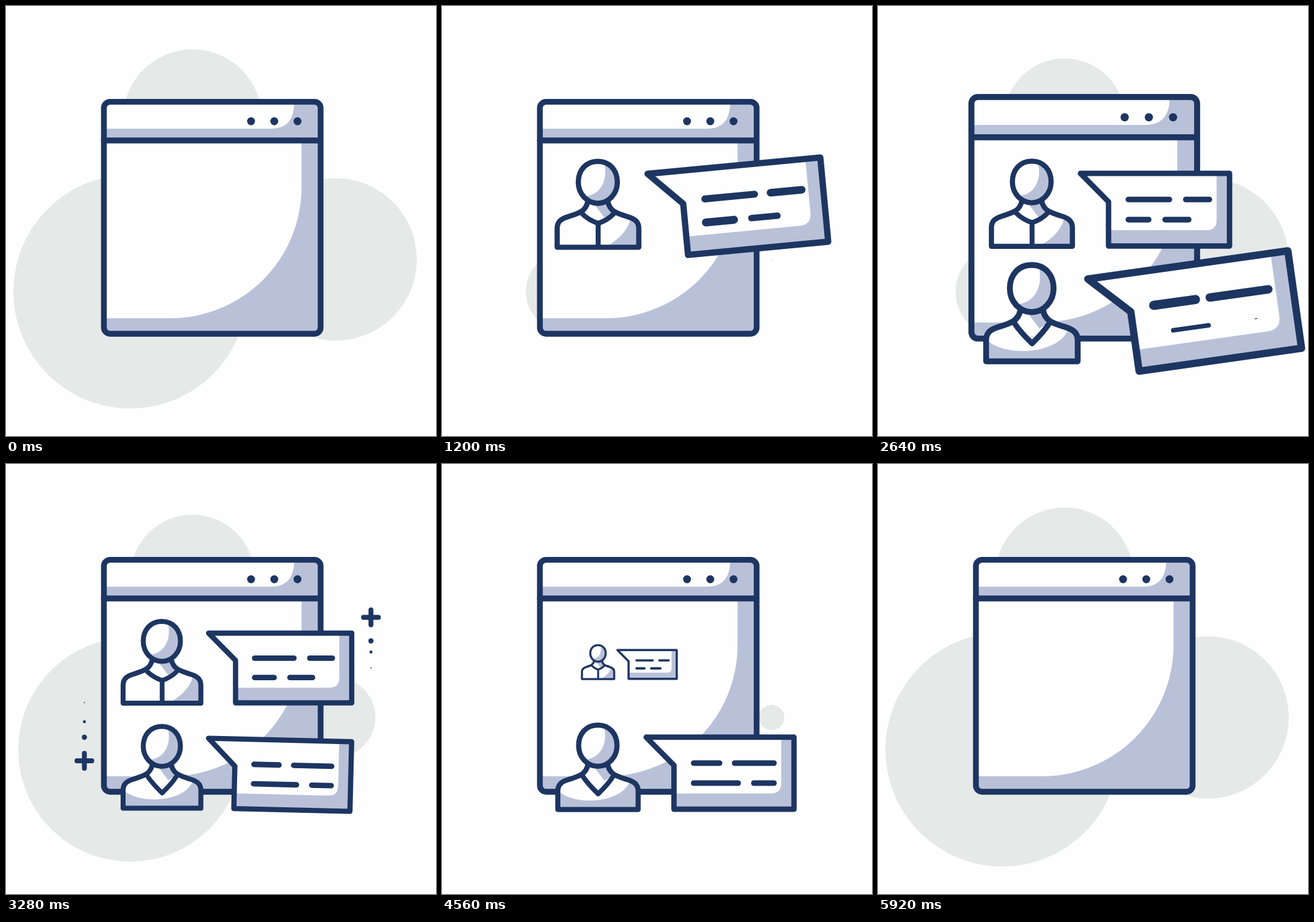
An HTML page with a canvas for the animation above (6 s loop, 694 px wide and 694 px high).

```html
<!DOCTYPE html>
<html lang="en">
<head>
<meta charset="utf-8">
<title>Chat window</title>
<style>
  html, body { margin: 0; width: 100%; height: 100%; overflow: hidden; background: #fefefe; }
  canvas { display: block; width: 694px; height: 694px; }
</style>
</head>
<body>
<canvas id="stage" width="694" height="694"></canvas>
<script>
const ctx = document.getElementById('stage').getContext('2d');
const NAVY = '#1d3561', SHADE = '#b9c1d9', PALE = '#e5e9e8', WHITE = '#fefefe';
const LOOP = 6000, STEP = 80;
const ROW = 169.5; // distance between the two chat rows

// Eased track through time/value pairs; holds its ends.
function track(t, ...keys) {
  if (t <= keys[0]) return keys[1];
  for (let i = 2; i < keys.length; i += 2) {
    if (t < keys[i]) {
      const x = (t - keys[i - 2]) / (keys[i] - keys[i - 2]);
      return keys[i - 1] + (keys[i + 1] - keys[i - 1]) * (1 - Math.cos(Math.PI * x)) / 2;
    }
  }
  return keys[keys.length - 1];
}

const popIn = (t, start, rise, fall) =>
  track(t, start, 0, start + rise, 1.2, start + rise + fall, 1);

// Draws around a pivot, scaled and turned.
function around(x, y, scale, degrees, draw) {
  if (scale < 0.004) return;
  ctx.save();
  ctx.translate(x, y);
  ctx.rotate(degrees * Math.PI / 180);
  ctx.scale(scale, scale);
  ctx.translate(-x, -y);
  draw();
  ctx.restore();
}

function fill(d, color) {
  ctx.fillStyle = color;
  ctx.fill(new Path2D(d));
}

function stroke(d, width) {
  ctx.strokeStyle = NAVY;
  ctx.lineWidth = width;
  ctx.lineJoin = ctx.lineCap = 'round';
  ctx.stroke(new Path2D(d));
}

function disc(x, y, r, color) {
  ctx.fillStyle = color;
  ctx.beginPath();
  ctx.arc(x, y, Math.max(r, 0), 0, 7);
  ctx.fill();
}

function clipped(d, draw) {
  ctx.save();
  ctx.clip(new Path2D(d));
  draw();
  ctx.restore();
}

function backdrop(t) {
  disc(200.5, 461, 188.5 * track(t, 0, 1, 2000, 0, 3472, 1, 4900, 0, 5920, 1), PALE);
  disc(301, 182, 112 * track(t, 0, 1, 1600, 0, 2960, 1, 4480, 0, 5960, 1), PALE);
  disc(532, 409, 131 * track(t, 0, 1, 1100, 0, 2590, 1, 3954, 0, 4100, 0, 5880, 1), PALE);
}

function browser(t) {
  const frame = new Path2D();
  frame.roundRect(158, 154.6, 349.8, 374.4, 10);
  ctx.fillStyle = SHADE;
  ctx.fill(frame);
  fill('M160 157H465C465 184 452 198 428 198H160Z', WHITE);
  fill('M160 217H477V292A212 212 0 0 1 265 504H160Z', WHITE);
  ctx.strokeStyle = NAVY;
  ctx.lineWidth = 9.3;
  ctx.stroke(frame);
  stroke('M158 217H507', 9.3);
  for (let i = 0; i < 3; i++) {
    const dip = 1600 + 160 * i;
    disc(395.5 + 37.5 * i, 186, 6.4 * track(t, dip - 160, 1, dip, 0.78, dip + 160, 1), NAVY);
  }
}

const HEAD = 'M251.5 254C270 254 281.5 268 281.5 286C281.5 304 268 318.5 251.5 318.5' +
  'C235 318.5 221.5 304 221.5 286C221.5 268 233 254 251.5 254Z';
const BODY = 'M189 386V357C189 346 196 342 206 339C222 334 233 331 236 316' +
  'H267C270 331 281 334 297 339C307 342 314.5 346 314.5 357V386Z';

function person(vNeck) {
  fill(BODY, WHITE);
  clipped(BODY, () => {
    fill(vNeck
      ? 'M185 350C200 381 292 381 303 338H325V392H185Z'
      : 'M302 335C303 354 286 374 262 386H325V335Z', SHADE);
    if (vNeck) fill('M228 316H275V334L252 361L228 334Z', WHITE);
    fill('M243 316H272L275 333L262 341Z', SHADE);
  });
  stroke(BODY, 8);
  stroke(vNeck ? 'M228 334Q236 346 252 361.5Q268 346 275.5 334'
               : 'M228 335Q237 344 252 349.5Q267 344 275.5 335M252 349V385', 7.6);
  fill(HEAD, WHITE);
  clipped(HEAD, () =>
    fill('M259 250C269 276 260 307 229 308L240 325H290V250Z', SHADE));
  stroke(HEAD, 8);
}

function bubble(t, start, dashes) {
  const outline = 'M327 273H558V385.5H370.5V317Z';
  fill(outline, SHADE);
  fill('M327 273H538V345Q538 361 522 361H370.5V317Z', WHITE);
  stroke(outline, 8.4);
  dashes.forEach(([left, right], i) => {
    const y = i < 2 ? 313.4 : 344.7;
    const size = popIn(t, start + 700 + 96 * i, 300, 300);
    around((left + right) / 2, y, size, 0, () =>
      stroke(`M${left + 4.3} ${y}H${right - 4.3}`, 8.8));
  });
}

function chatRow(t, start, exit, vNeck, dashes) {
  const size = t < exit
    ? popIn(t, start + 200, 600, 600)
    : track(t, exit, 1, exit + 600, 1.2, exit + 1200, 0);
  const local = t - start;
  const tilt = track(local, 640, 0, 1050, -8, 1500, 2.4, 1900, 0);
  around(252, 319.5, size, 0, () => {
    person(vNeck);
    around(323.5, 269, popIn(local, 410, 600, 600), tilt, () => bubble(t, start, dashes));
  });
}

function sparkle(t, x, y, gaps) {
  const out = track(t, 3900, 1, 4400, 0);
  const size = i => popIn(t, 2840 + 100 * i, 600, 400) * out;
  around(x, y, size(0), 0, () => stroke(`M${x - 12} ${y}H${x + 12}M${x} ${y - 12}V${y + 12}`, 7.8));
  gaps.forEach((gap, i) => disc(x, y + gap, 5.8 * size(i + 1), NAVY));
}

function render(t) {
  ctx.fillStyle = WHITE;
  ctx.fillRect(0, 0, 694, 694);
  backdrop(t);
  const zoom = track(t, 0, 1, 600, 1.25, 1200, 1, 1600, 1, 2200, 1.25, 2800, 1);
  around(332.5, 341.5, zoom, 0, () => {
    browser(t);
    chatRow(t, 0, 3600, false, [[397, 469], [486, 531], [397, 437], [454, 499]]);
    ctx.translate(0, ROW);
    chatRow(t, 1600, 4400, true, [[397, 446], [461, 531], [397, 475], [491, 531]]);
  });
  sparkle(t, 589, 247.5, [38, 56, 81.5]);
  sparkle(t, 126.5, 479, [-38, -63, -94]);
}

const begin = performance.now();
function tick() {
  const t = (performance.now() - begin) % LOOP;
  render(Math.floor(t / STEP) * STEP);
  requestAnimationFrame(tick);
}
tick();
</script>
</body>
</html>
```
